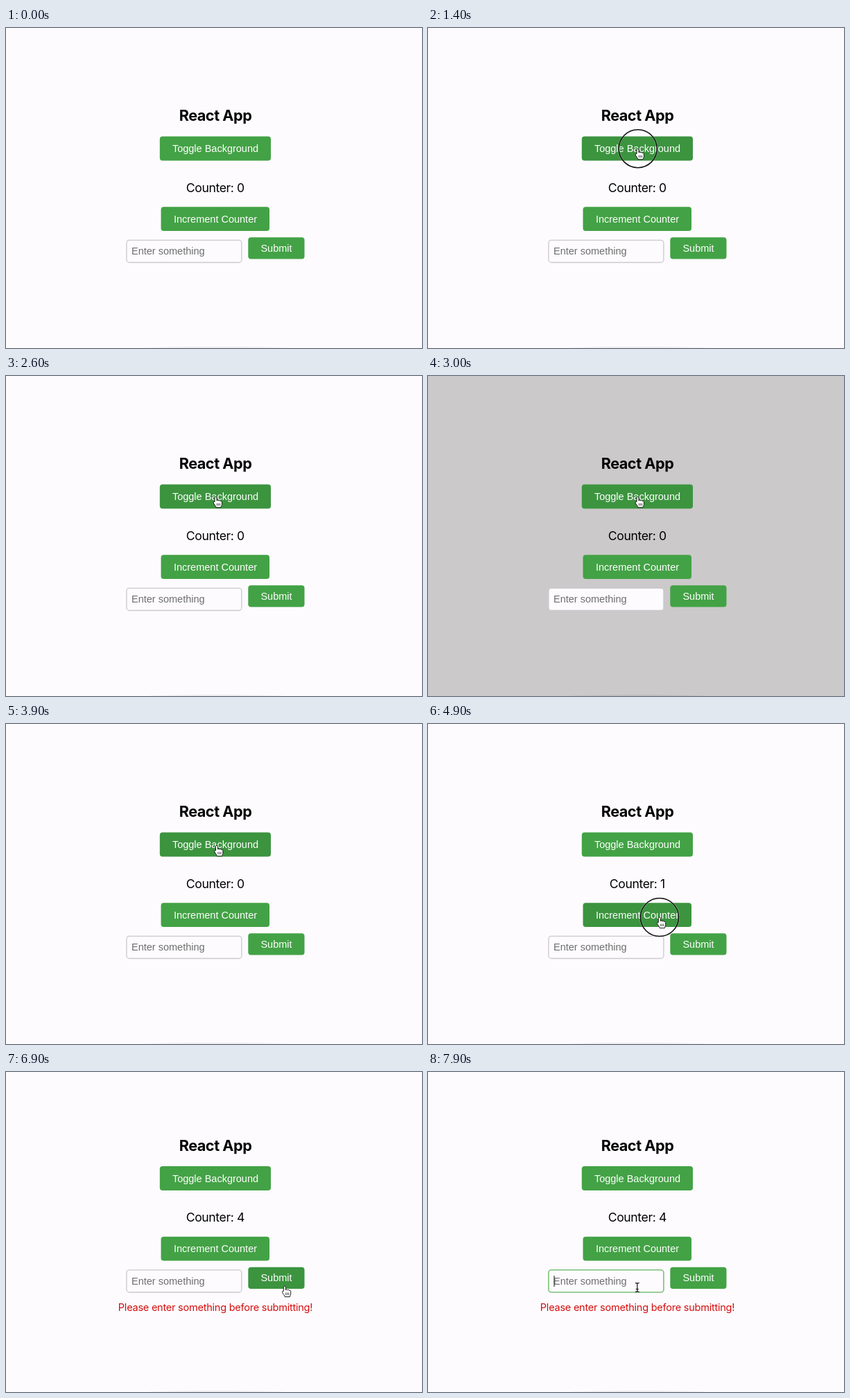
Recreate the animation shown at these times as an HTML page. Size 600 px wide and 462 px high, loop 8 s.

```html
<!DOCTYPE html>
<html lang="en">
<head>
<meta charset="utf-8">
<title>React App</title>
<style>
  html, body { margin: 0; width: 100%; height: 100%; overflow: hidden; background: #fdfbfe; }
  svg { display: block; width: 100%; height: 100%; }
  text { white-space: pre; }
  .ui { font: 14.5px "Liberation Sans", Arial, sans-serif; text-anchor: middle; fill: #fff; }
  .sys { font-family: Inter, sans-serif; text-anchor: middle; }
  #title { font-size: 21.6px; font-weight: 700; letter-spacing: -.02em; }
  #count { font-size: 17.6px; letter-spacing: -.022em; }
  #error { font-size: 14.5px; letter-spacing: -.016em; fill: #d40d0d; }
  #hint { text-anchor: start; fill: #6e6e6e; }
</style>
</head>
<body>
<svg viewBox="0 0 600 462">
  <rect id="bg" width="600" height="462"/>
  <ellipse cx="303" cy="463" rx="105" ry="3" opacity=".06"/>
  <g id="app">
    <text id="title" class="sys" x="302" y="134.3">React App</text>
    <rect id="toggle" x="221.8" y="156.5" width="160.2" height="35" rx="4"/>
    <text class="ui" x="302" y="179.2">Toggle Background</text>
    <text id="count" class="sys" x="301.8" y="236.5"></text>
    <rect id="inc" x="223.5" y="258.2" width="156.5" height="34.8" rx="4"/>
    <text class="ui" x="302" y="280.6">Increment Counter</text>
    <rect id="field" x="173.9" y="306.3" width="166" height="32.2" rx="4" fill="#fdfbfe"/>
    <text id="hint" class="ui" x="181" y="327.2">Enter something</text>
    <path id="caret" d="M182 314.5v16" stroke="#333" stroke-width="1.2"/>
    <rect id="submit" x="349.3" y="302.2" width="81.2" height="31.2" rx="4"/>
    <text class="ui" x="390" y="322.6">Submit</text>
  </g>
  <text id="error" class="sys" x="302" y="345">Please enter something before submitting!</text>
  <g id="pointer">
    <g id="ring" fill="none">
      <circle r="27.5" stroke="#fff" stroke-opacity=".35" stroke-width="2.8"/>
      <circle r="27.5" stroke="#111" stroke-width="1.6"/>
    </g>
    <path id="arrow" d="M0 0V13.5L3.1 10.6 5.1 15.2 7.3 14.2 5.3 9.8H9.4Z" stroke="#fff"/>
    <g id="hand" transform="scale(1.06)" stroke="#111" stroke-width=".9" stroke-linejoin="round">
      <path fill="#fff" d="M-1.6 7.2V1.5a1.4 1.4 0 0 1 2.8 0V5.4c.5-1 2.4-.9 2.6.2.6-.8 2.2-.6 2.4.5.8-.6 2 0 2 1.2v3.1c0 1.5-1 2.2-1.2 4.3H.2C0 12.7-2.6 10.8-3.3 8.4-3.6 7-2.2 6.4-1.6 7.2Z"/>
      <path fill="none" stroke-width=".7" d="M1.6 9v3.3M3.5 9v3.3M5.4 9v3.3"/>
    </g>
    <path id="beam" fill="none" stroke="#111" stroke-width="1.2" d="M-3-6.5Q0-6.5 0-5V5Q0 6.5-3 6.5M3-6.5Q0-6.5 0-5M0 5Q0 6.5 3 6.5M-2 2.5h4"/>
  </g>
</svg>
<script>
const LOOP = 8000, STEP = 100, SHIFT = -20.5, PRESS = 150;
const buttons = ["toggle", "inc", "submit"], texts = ["count", "field"];

// evenly spaced clicks on each control
const clicks = {
  toggle: { first: 1500, gap: 340, n: 8 },
  inc: { first: 4800, gap: 200, n: 4 },
  submit: { first: 6900, gap: LOOP, n: 1 },
  field: { first: 7800, gap: LOOP, n: 1 }
};
const entry = { x: 330, y: 466 };
const moves = [
  { from: 0, to: 1000, x: 302.7, y: 174.2 },
  { from: 3300, to: 3400, x: 304.2, y: 175.2 },
  { from: 4000, to: 4600, x: 334, y: 279 },
  { from: 5650, to: 6200, x: 402, y: 309 },
  { from: 7000, to: 7650, x: 301.8, y: 311 }
];

const $ = id => document.getElementById(id);
const show = (id, on) => $(id).setAttribute("visibility", on ? "visible" : "hidden");
const clamp = (v, lo, hi) => Math.min(hi, Math.max(lo, v));
const ease = k => k * k * (3 - 2 * k);

function clicked(id, t) {
  const { first, gap, n } = clicks[id];
  return clamp(Math.floor((t - first) / gap) + 1, 0, n);
}

const pressed = t => Object.keys(clicks).some(id => clicked(id, t + PRESS) > clicked(id, t));

function pointerAt(t) {
  return moves.reduce((p, m) => {
    const k = ease(clamp((t - m.from) / (m.to - m.from), 0, 1));
    return { x: p.x + (m.x - p.x) * k, y: p.y + (m.y - p.y) * k };
  }, entry);
}

function areaAt(t) {
  const p = pointerAt(t), y = p.y - clicked("submit", t) * SHIFT;
  return [...buttons, ...texts].find(id => {
    const b = $(id).getBBox();
    return p.x > b.x && p.x < b.x + b.width && y > b.y && y < b.y + b.height;
  });
}

// hover colour trails the pointer a little
function buttonColor(id, t) {
  const lag = [STEP, 2 * STEP];
  const k = lag.filter(d => t >= d && areaAt(t - d) === id).length / lag.length;
  const mix = (a, b) => Math.round(a + (b - a) * k);
  return `rgb(${mix(67, 60)},${mix(162, 148)},${mix(69, 63)})`;
}

function draw(t) {
  const failed = clicked("submit", t), focused = clicked("field", t);

  $("bg").setAttribute("fill", clicked("toggle", t) % 2 ? "#cbc9ca" : "#fdfbfe");
  $("app").setAttribute("transform", `translate(0 ${failed * SHIFT})`);
  $("count").textContent = "Counter: " + clicked("inc", t);
  for (const id of buttons) $(id).setAttribute("fill", buttonColor(id, t));
  $("field").setAttribute("stroke", focused ? "#7bc079" : "#cbc9cc");
  $("field").setAttribute("stroke-width", focused ? 1.6 : 1.3);
  show("caret", focused);
  show("error", failed);

  const { x, y } = pointerAt(t), area = areaAt(t);
  const hand = buttons.includes(area), beam = texts.includes(area);
  $("pointer").setAttribute("transform", `translate(${x} ${y})`);
  show("hand", hand);
  show("beam", beam);
  show("arrow", !hand && !beam);
  show("ring", pressed(t));
}

let start;
function tick(now) {
  start ??= now;
  const t = (now - start) % LOOP;
  draw(Math.floor(t / STEP) * STEP);
  requestAnimationFrame(tick);
}
draw(0);
requestAnimationFrame(tick);
</script>
</body>
</html>
```
